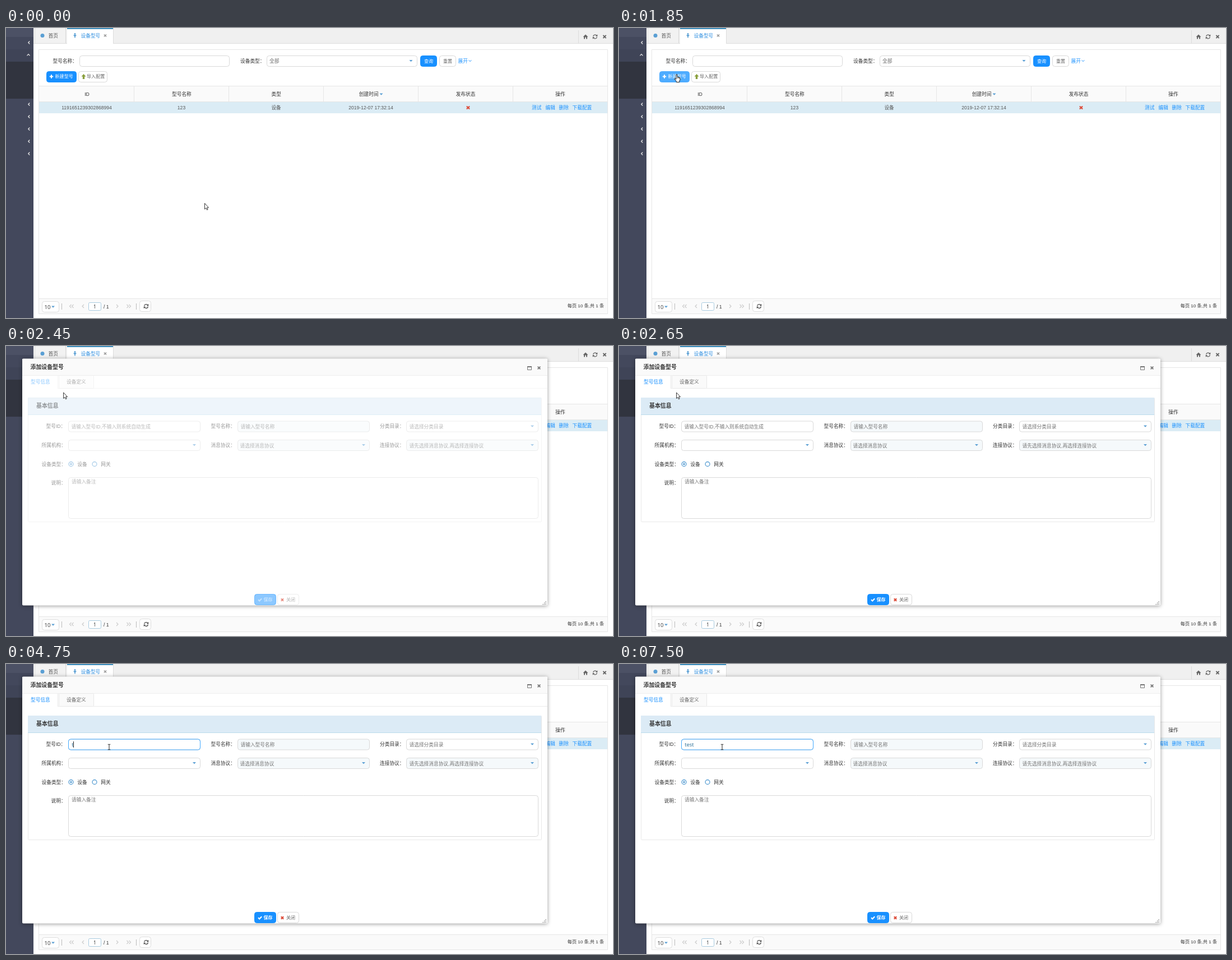
Write an HTML page with a canvas that moves like this. It is 1083 px wide and 517 px high and loops after 8 s.

```html
<!DOCTYPE html>
<html lang="zh-CN">
<head>
<meta charset="utf-8">
<style>
html, body { margin: 0; width: 100%; height: 100%; overflow: hidden; background: #fff; }
canvas { display: block; }
</style>
</head>
<body>
<canvas id="stage" width="1083" height="517"></canvas>
<script>
const ctx = document.getElementById('stage').getContext('2d');
const LOOP = 8000;
const SANS = '"Liberation Sans", "Noto Sans CJK SC", "Noto Sans CJK", sans-serif';
const HUMANIST = '"Open Sans", "Noto Sans", sans-serif';
const BLUE = '#1890ff', CARET = '#5a9fd4', INK = '#333', SOFT = '#666', EDGE = '#d9d9d9', RULE = '#e6e6e6';

// ---- drawing helpers ----
function rect(x, y, w, h, color) {
  ctx.fillStyle = color;
  ctx.fillRect(x, y, w, h);
}

function box(x1, y1, x2, y2, fill, border, radius = 4) {
  ctx.beginPath();
  ctx.roundRect(x1 + .5, y1 + .5, x2 - x1 - 1, y2 - y1 - 1, radius);
  if (fill) { ctx.fillStyle = fill; ctx.fill(); }
  if (border) { ctx.strokeStyle = border; ctx.lineWidth = 1; ctx.stroke(); }
}

function text(str, x, cy, { size = 8.7, color = INK, align = 'left', weight = 400, family = SANS } = {}) {
  ctx.font = `${weight} ${size}px ${family}`;
  ctx.textAlign = align;
  ctx.fillStyle = color;
  ctx.fillText(str, x, cy + size * .37);
}

// points: [x, y, x, y, ...] relative to (x, y)
function trace(x, y, points) {
  ctx.beginPath();
  for (let i = 0; i < points.length; i += 2) ctx.lineTo(x + points[i], y + points[i + 1]);
}

function line(x, y, points, color, width = 1) {
  trace(x, y, points);
  ctx.strokeStyle = color;
  ctx.lineWidth = width;
  ctx.stroke();
}

function shape(x, y, points, color) {
  trace(x, y, points);
  ctx.closePath();
  ctx.fillStyle = color;
  ctx.fill();
}

function disc(x, y, r, color) {
  ctx.beginPath();
  ctx.arc(x, y, r, 0, 7);
  ctx.fillStyle = color;
  ctx.fill();
}

const cross = (x, y, r, color, width) => {
  line(x, y, [-r, -r, r, r], color, width);
  line(x, y, [r, -r, -r, r], color, width);
};
const plus = (x, y, r, color) => {
  line(x, y, [-r, 0, r, 0], color, 2);
  line(x, y, [0, -r, 0, r], color, 2);
};
const dropArrow = (x, y, color = CARET) => shape(x, y, [-3, -1.5, 3, -1.5, 0, 1.8], color);
const chevron = (x, y, dir, color, s = 2.5) => line(x, y, [-dir * s / 2, -s, dir * s / 2, 0, -dir * s / 2, s], color, 1.2);

function refresh(x, y, color) {
  ctx.strokeStyle = color;
  ctx.lineWidth = 1.4;
  for (const start of [Math.PI * 1.05, Math.PI * .05]) {
    ctx.beginPath();
    ctx.arc(x, y, 3.4, start, start + 2.4);
    ctx.stroke();
  }
  shape(x, y, [4.3, -4.2, 4.3, -.6, 1, -.6], color);
  shape(x, y, [-4.3, 4.2, -4.3, .6, -1, .6], color);
}

// ---- page ----
function sidebar() {
  rect(0, 0, 49, 517, '#43485c');
  rect(0, 0, 49, 16, '#4c5165');
  rect(0, 38, 49, 22, '#3f4457');
  rect(0, 60, 49, 66, '#31343f');
  for (const y of [26, 136, 158, 180, 202, 224]) chevron(41, y, -1, '#eee');
  line(40, 48, [-2.5, 1.3, 0, -1.3, 2.5, 1.3], '#eee', 1.2);
}

function tabBar() {
  rect(49, 0, 1034, 28, '#f0f0f0');
  rect(49, 27, 1034, 1, '#ddd');
  rect(52, 0, 54, 27, '#f2f2f2');
  rect(51, 0, 1, 27, '#e0e0e0');
  rect(106, 0, 1, 27, '#d8d8d8');
  disc(65, 13.5, 3.5, CARET);
  text('首页', 75.5, 13.5, { color: '#555' });

  rect(109, 0, 82, 28, '#fff');
  rect(109, 0, 82, 2, '#3c8dbc');
  rect(191, 0, 1, 27, '#ddd');
  disc(123, 10.4, 1.3, CARET);
  shape(123, 13.5, [-3, -.5, 0, -2, 3, -.5, 1, 1, .7, 4, -.7, 4, -1, 1], CARET);
  text('设备型号', 133.5, 13.5, { color: '#2f8fe0' });
  cross(177, 13.5, 2.1, '#999', 1.4);

  rect(1021, 4, 1, 23, '#ddd');
  shape(1034, 15.5, [-4.5, .3, 0, -4, 4.5, .3, 3, .3, 3, 4, 1, 4, 1, 1, -1, 1, -1, 4, -3, 4, -3, .3], '#666');
  refresh(1051, 15.5, '#666');
  cross(1068, 15.5, 2.6, '#666', 2);
}

function filters(buttonHover) {
  text('型号名称：', 83.5, 59);
  box(131, 49, 399, 69, '#fff', EDGE);
  text('设备类型：', 418, 59);
  box(465, 49, 734, 69, '#fff', EDGE);
  text('全部', 470, 59, { color: SOFT });
  dropArrow(722.5, 58.5);
  box(739, 49, 769, 69, BLUE, BLUE);
  text('查询', 754, 59, { size: 8.1, color: '#fff', align: 'center' });
  box(773, 49, 803, 69, '#fff', EDGE);
  text('重置', 788, 59, { size: 8.1, color: SOFT, align: 'center' });
  text('展开', 806.5, 58.5, { color: BLUE });
  line(828, 58.5, [-2.3, -1.2, 0, 1.2, 2.3, -1.2], BLUE);

  const fill = buttonHover ? '#4eacff' : BLUE;
  box(72, 77, 126, 97, fill, fill);
  plus(81, 86.5, 3.2, '#fff');
  text('新建型号', 87.5, 86.5, { size: 8.1, color: '#fff' });
  box(129, 77, 181, 97, '#fff', EDGE);
  shape(138.5, 86.5, [-4, 0, 0, -4.5, 4, 0, 1.7, 0, 1.7, 4.5, -1.7, 4.5, -1.7, 0], '#8a9f3c');
  text('导入配置', 144, 86.5, { size: 8.1, color: SOFT });
}

function table(headerHover) {
  rect(59, 103, 1014, 28, '#fafafa');
  if (headerHover) rect(60, 104, 168, 27, '#e6f7ff');
  rect(59, 103, 1014, 1, RULE);
  for (let i = 1; i < 6; i++) rect(59 + Math.round(i * 169), 104, 1, 27, RULE);
  ['ID', '型号名称', '类型', '创建时间', '发布状态', '操作'].forEach((name, i) =>
    text(name, 144.5 + i * 168.9 - (i === 3 ? 4 : 0), 117.5, { align: 'center' }));
  dropArrow(669.5, 118);

  rect(59, 131, 1014, 21, '#dbecf5');
  rect(59, 131, 1014, 1, RULE);
  const cell = { size: 8.55, color: '#555', align: 'center' };
  text('1191651239302868994', 144, 142, cell);
  text('123', 313, 142, cell);
  text('设备', 482, 142, cell);
  text('2019-12-07 17:32:14', 651, 142, cell);
  cross(824.5, 142, 2.6, '#dd4b39', 2.1);
  const link = { color: BLUE };
  text('测试', 938, 142, link);
  text('编辑', 962.5, 142, link);
  text('删除', 986.5, 142, link);
  text('下载配置', 1010.5, 142, link);
}

function pager() {
  rect(59, 482, 1014, 27, '#fafafa');
  rect(59, 482, 1014, 1, RULE);
  box(64, 487, 95, 507, '#fff', '#ddd');
  text('10', 68.5, 497, { size: 9.5, family: HUMANIST });
  dropArrow(84, 497);
  rect(99, 491, 1, 11, '#bbb');
  rect(232, 491, 1, 11, '#bbb');
  for (const x of [115, 119, 137.5]) chevron(x, 496, -1, '#ccc', 3);
  for (const x of [198.5, 217, 221]) chevron(x, 496, 1, '#ccc', 3);
  box(147, 489, 170, 504, '#fff', '#a9cbe0', 2);
  text('1', 158.5, 496.5, { align: 'center', family: HUMANIST });
  text('/ 1', 174, 496.5);
  box(238, 486, 259, 506, '#fff', '#ddd');
  refresh(250, 496, '#555');
  text('每页 10 条,共 1 条', 1067, 495.5, { size: 8.1, align: 'right' });
}

function page(pointer) {
  rect(0, 0, 1083, 517, '#fff');
  sidebar();
  tabBar();
  box(58, 38, 1074, 510, '#fff', RULE, 0);
  const { x, y } = pointer;
  filters(x > 72 && x < 126 && y > 77 && y < 97);
  table(x > 59 && x < 228 && y >= 103 && y < 131);
  pager();
}

// ---- dialog ----
function dialogFrame(hasTitle) {
  ctx.save();
  ctx.shadowColor = 'rgba(0,0,0,.4)';
  ctx.shadowBlur = 7;
  ctx.shadowOffsetY = 1;
  ctx.beginPath();
  ctx.roundRect(29, 22.5, 937, 440, 2);
  ctx.fillStyle = '#fff';
  ctx.fill();
  ctx.restore();
  rect(29, 23, 937, 29, '#fafafa');
  rect(29, 52, 937, 1, '#eee');
  if (hasTitle) text('添加设备型号', 43.5, 37, { size: 9.9, weight: 'bold' });
  box(930, 36, 938, 43, null, '#777', 0);
  rect(930, 36, 8, 2, '#777');
  cross(951, 39, 2.4, '#777', 1.7);
  for (let row = 0; row < 3; row++)
    for (let col = 2 - row; col < 3; col++) rect(957.5 + col * 2.5, 455 + row * 2.5, 1.2, 1.2, '#666');
}

function field(x1, cy, x2, hint, { disabled, select } = {}) {
  box(x1, cy - 10, x2, cy + 10, disabled ? '#f5f9fb' : '#fff', EDGE);
  if (hint) text(hint, x1 + (select && x1 < 700 ? 4.5 : 5.5), cy + .5, { color: '#757575' });
  if (select) dropArrow(x2 - 11, cy - .5);
}

function typedText(t) {
  return 'test'.slice(0, [4750, 4900, 5200, 5350].filter(at => t >= at).length);
}

function caretVisible(t) {
  if (t < 4750) return t < 4200;
  const sinceTyping = t - 5350;
  return sinceTyping < 0 || Math.floor((sinceTyping + 1) / 540) % 2 === 0;
}

function idField(t) {
  const typed = typedText(t), focused = t >= 3650;
  field(111, 143.5, 347, typed ? '' : '请输入型号ID,不输入则系统自动生成');
  if (!focused) return;
  box(111, 133.5, 347, 153.5, null, '#40a9ff');
  text(typed, 117.2, 143.5, { size: 9.4, family: HUMANIST, color: '#246a94' });
  const width = typed ? ctx.measureText(typed).width : 0;
  if (caretVisible(t)) rect(Math.round(116.8 + width), 138, 1, 11, '#222');
}

function radio(x, y, label, checked) {
  ctx.beginPath();
  ctx.arc(x, y, 4, 0, 7);
  ctx.fillStyle = '#fff';
  ctx.fill();
  ctx.strokeStyle = CARET;
  ctx.lineWidth = 1.3;
  ctx.stroke();
  if (checked) disc(x, y, 1.8, CARET);
  text(label, x + 11.3, y);
}

function dialogContent(t) {
  rect(93, 75, 873, 1, '#eaeaea');
  box(94, 52, 157, 76, '#fafafa', '#e8e8e8', 1);
  rect(92, 53, 1, 23, '#e8e8e8');
  text('型号信息', 44, 64, { color: BLUE });
  text('设备定义', 108, 64, { color: SOFT });

  box(39, 92, 956, 314, null, '#e8e8e8', 1);
  rect(39, 92, 916, 30, '#dcebf6');
  rect(39, 122, 916, 1, '#bcdcec');
  text('基本信息', 54, 106.5, { size: 9.9, weight: 'bold' });

  text('型号ID：', 71.5, 143);
  idField(t);
  text('型号名称：', 365.5, 143);
  field(413, 143.5, 649, '请输入型号名称', { disabled: true });
  text('分类目录：', 667, 143);
  field(714, 143.5, 950, '请选择分类目录', { select: true });

  text('所属机构：', 63.5, 176.5);
  field(111, 177, 347, '', { select: true });
  text('消息协议：', 365.5, 176.5);
  field(413, 177, 649, '请选择消息协议', { disabled: true, select: true });
  text('连接协议：', 667, 176.5);
  field(714, 177, 950, '请先选择消息协议,再选择连接协议', { disabled: true, select: true });

  text('设备类型：', 63.5, 210.5);
  radio(116, 210.5, '设备', true);
  radio(158, 210.5, '网关', false);
  text('说明：', 80.5, 243.5);
  box(111, 234, 950, 308, '#fff', EDGE);
  text('请输入备注', 117, 241.5, { color: '#757575' });

  box(443, 442, 482, 462, BLUE, BLUE);
  line(453, 452.5, [-3, -.2, -.8, 2, 3.2, -2.3], '#fff', 2);
  text('保存', 459.5, 452, { size: 8.1, color: '#fff', weight: 'bold' });
  box(484, 442, 523, 462, '#fff', EDGE);
  cross(493, 452.5, 2.2, '#dd4b39', 2);
  text('关闭', 500, 452, { size: 8.1, color: SOFT });
}

function dialog(t) {
  dialogFrame(t >= 2400);
  if (t < 2400) return;
  const progress = Math.min(1, (t - 2350) / 300);
  ctx.globalAlpha = 1 - (1 - progress) ** 1.7;
  dialogContent(t);
  ctx.globalAlpha = 1;
}

// ---- pointer ----
const PATH = [
  [150, 354.5, 312.5], [600, 114.5, 104], [950, 106.5, 79.5], [1050, 106.5, 79.5],
  [1400, 103, 82.5], [2800, 102.5, 83], [3150, 186.5, 160], [3300, 186.5, 153], [3450, 184, 148],
];

function pointerAt(t) {
  const next = PATH.findIndex(([at]) => at > t);
  const [t1, x1, y1] = PATH[next < 0 ? PATH.length - 1 : Math.max(0, next - 1)];
  if (next <= 0) return { x: x1, y: y1 };
  const [t2, x2, y2] = PATH[next];
  const p = (t - t1) / (t2 - t1), e = p * p * (3 - 2 * p);
  return { x: x1 + (x2 - x1) * e, y: y1 + (y2 - y1) * e };
}

function arrow(x, y) {
  const points = [0, 0, 0, 10.5, 2.4, 8.4, 4, 11.8, 5.6, 11, 4.1, 7.7, 7, 7.7];
  shape(x, y, points, '#fff');
  line(x, y, [...points, 0, 0], '#222', .9);
}

function hand(x, y) {
  const points = [-1, .5, 0, 0, 1, .5, 1.2, 4.5, 3.2, 5, 5.8, 6, 6.2, 9, 5, 12, 5, 14,
    -.5, 14, -.8, 12, -3.8, 8.5, -3.2, 7.2, -1, 8.8];
  shape(x, y, points, '#fff');
  line(x, y, [...points, -1, .5], '#222', 1);
  for (const dx of [1.2, 3, 4.6]) line(x, y, [dx, 5, dx, 7.5], '#222', .7);
}

function textBeam(x, y) {
  line(x, y, [0, -4.5, 0, 4.5], '#222');
  for (const dy of [-4.7, 4.7]) line(x, y, [-2.3, dy, 2.3, dy], '#222', .9);
}

function drawPointer(t, { x, y }) {
  if (t >= 1900) {
    const overInput = x > 112 && x < 346 && y > 133.5 && y < 154;
    (overInput ? textBeam : arrow)(x, y);
  } else {
    (y < 97 && x < 126 ? hand : arrow)(x, y);
  }
}

function render() {
  const t = Math.floor(performance.now() % LOOP / 50) * 50;
  const pointer = pointerAt(t);
  page(pointer);
  if (t >= 1900) dialog(t);
  drawPointer(t, pointer);
  requestAnimationFrame(render);
}
render();
</script>
</body>
</html>
```
